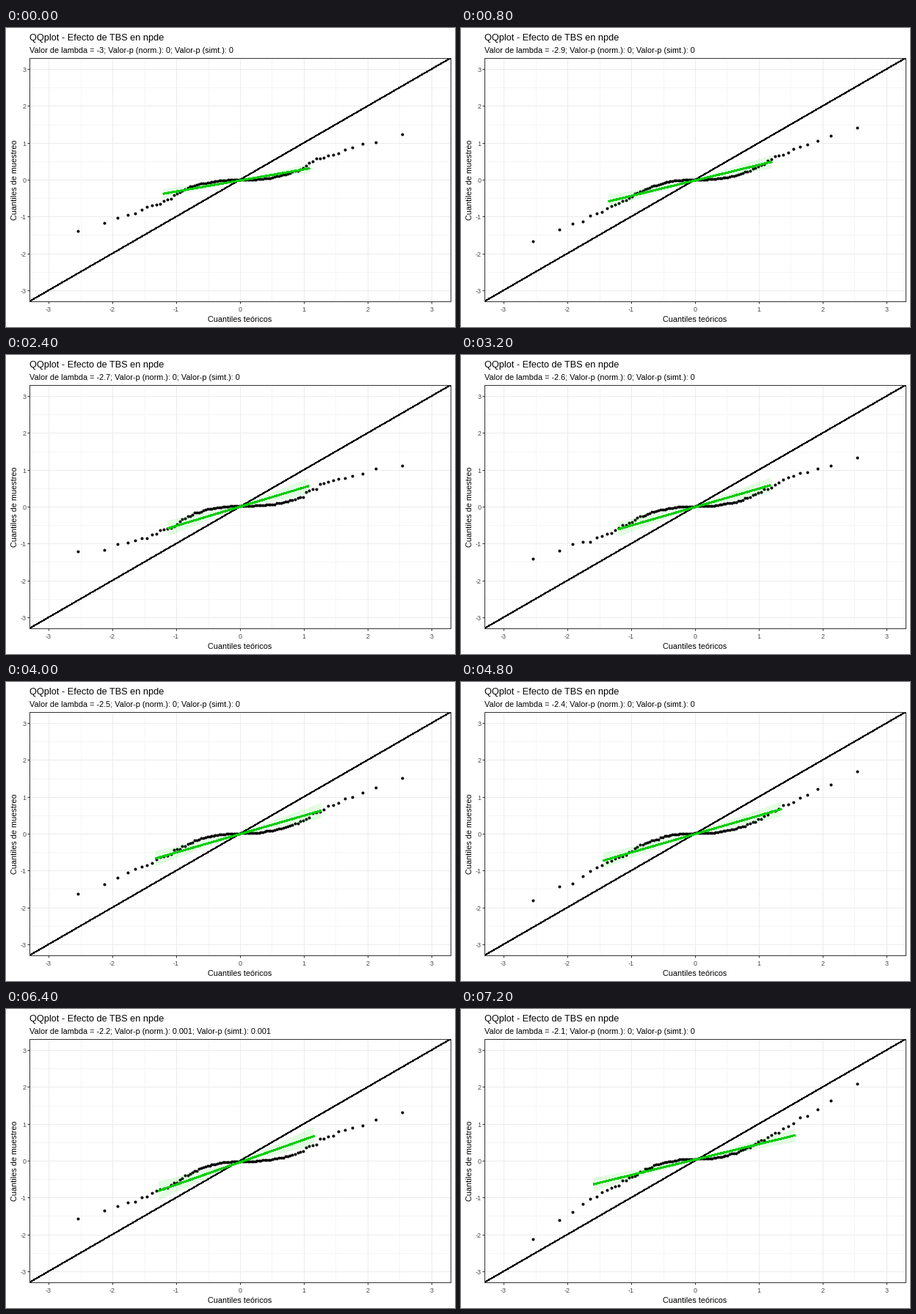
These frames come from a looping animation (612x408 px, 8 s). A matplotlib script:

```python
import math

import matplotlib.pyplot as plt
import numpy as np
from matplotlib.animation import FuncAnimation

W, H, DPI = 612, 408, 72
LEFT, RIGHT, TOP, BOTTOM = 32, 606, 41, 373
MID_X, MID_Y = (LEFT + RIGHT) / 2, (TOP + BOTTOM) / 2
LIM = 3.3
N = 90

plt.rcParams["font.family"] = "Liberation Sans"

# Key shapes by lambda: centre, then knee and end of each tail
# as distances from the centre (low, high), then slope of the fitted line.
SHAPES = {
    -3.0: (0.00, 0.36, 1.40, 0.31, 1.19, 0.30),
    -2.9: (0.00, 0.45, 1.68, 0.35, 1.40, 0.42),
    -2.8: (0.03, 0.55, 1.17, 0.18, 0.92, 0.54),
    -2.6: (0.01, 0.40, 1.41, 0.35, 1.35, 0.50),
    -2.4: (0.01, 0.49, 1.85, 0.38, 1.67, 0.50),
    -2.3: (0.14, 0.30, 2.29, 0.60, 2.41, 0.33),
    -2.2: (-0.02, 0.58, 1.51, 0.27, 1.34, 0.61),
    -2.1: (0.05, 0.53, 2.16, 0.48, 2.03, 0.42),
}


def normal_quantiles(n):
    z = np.linspace(-4, 4, 4001)
    cdf = [0.5 * (1 + math.erf(v / math.sqrt(2))) for v in z]
    return np.interp((np.arange(n) + 0.5) / n, cdf, z)


theory = normal_quantiles(N)


def shape_at(lam):
    return [np.interp(lam, list(SHAPES), column) for column in zip(*SHAPES.values())]


def tail(dist, knee, end):
    """Flat core up to the knee at distance 1, then a rise to the end."""
    t = np.clip((dist - 1) / (theory[-1] - 1), 0, 1)
    return knee * np.minimum(dist, 1) ** 2.3 + (end - knee) * t ** (0.55 * end)


def sample_at(lam, seed):
    centre, low_knee, low_end, high_knee, high_end, _ = shape_at(lam)
    dist = np.abs(theory)
    y = np.where(theory < 0, -tail(dist, low_knee, low_end), tail(dist, high_knee, high_end))
    noise = np.random.default_rng(seed).normal(0, 0.025, N)
    return np.sort(centre + y + noise * np.minimum(dist, 1))


def fit_at(lam):
    """Fitted line with the half width of its confidence band."""
    centre, _, low_end, _, high_end, slope = shape_at(lam)
    x = np.linspace(-0.45 - 0.54 * (low_end - centre), 0.45 + 0.54 * (high_end + centre), 60)
    half = 0.42 * slope * np.sqrt(0.07 + 0.93 * np.linspace(-1, 1, 60) ** 2)
    return x, centre - 0.02 + slope * x, half


fig = plt.figure(figsize=(W / DPI, H / DPI), dpi=DPI, facecolor="white")
ax = fig.add_axes([LEFT / W, 1 - BOTTOM / H, (RIGHT - LEFT) / W, (BOTTOM - TOP) / H])
ax.set(xlim=(-LIM, LIM), ylim=(-LIM, LIM))


def label(x, y, text, size, color="black", **kw):
    """Place text with its baseline at a pixel counted from the top left."""
    return fig.text(x / W, 1 - y / H, text, size=size, color=color,
                    va="baseline", rotation_mode="anchor", **kw)


for v in np.arange(-3, 3.5, 0.5):
    major = v == int(v)
    style = dict(color="#EBEBEB" if major else "#F5F5F5", lw=1, zorder=1 if major else 0.5)
    ax.axvline(v, **style)
    ax.axhline(v, **style)

ticks = range(-3, 4)
ax.set_xticks(ticks, [])
ax.set_yticks(ticks, [])
ax.tick_params(length=3, width=1, color="#333333")
for spine in ax.spines.values():
    spine.set(color="#333333", linewidth=1, zorder=8)

for t in ticks:
    label(MID_X + t * 87, 387, str(t), 9, "#4D4D4D", ha="center")
    label(27.5, MID_Y + 4 - t * 50.3, str(t), 9, "#4D4D4D", ha="right")

label(32, 17, "QQplot - Efecto de TBS en npde", 12.7)
subtitle = label(32, 34, "", 10.9)
label(MID_X, 401, "Cuantiles teóricos", 10.9, ha="center")
label(15.5, MID_Y, "Cuantiles de muestreo", 10.9, rotation=90, ha="center")

ax.plot([-LIM, LIM], [-LIM, LIM], color="black", lw=1, aa=False, zorder=2)
dots, = ax.plot(theory, theory, "o", color="black", ms=4, mew=0, zorder=3)
band = ax.fill([0, 0, 0], [0, 0, 0], color="#00E600", alpha=0.11, lw=0, zorder=4)[0]
line, = ax.plot([], [], color="#00CD00", lw=2, aa=False, solid_capstyle="butt", zorder=5)


def update(i):
    lam = round(-3 + i / 10, 1)
    p = "0.001" if lam == -2.2 else "0"
    subtitle.set_text(f"Valor de lambda = {lam:g}; "
                      f"Valor-p (norm.): {p}; Valor-p (simt.): {p}")
    dots.set_ydata(sample_at(lam, i))

    x, y, half = fit_at(lam)
    line.set_data(x, y)
    band.set_xy(np.column_stack([np.r_[x, x[::-1]], np.r_[y + half, (y - half)[::-1]]]))
    return subtitle, dots, line, band


anim = FuncAnimation(fig, update, frames=10, interval=800, repeat=True, repeat_delay=0)
plt.show()
```
